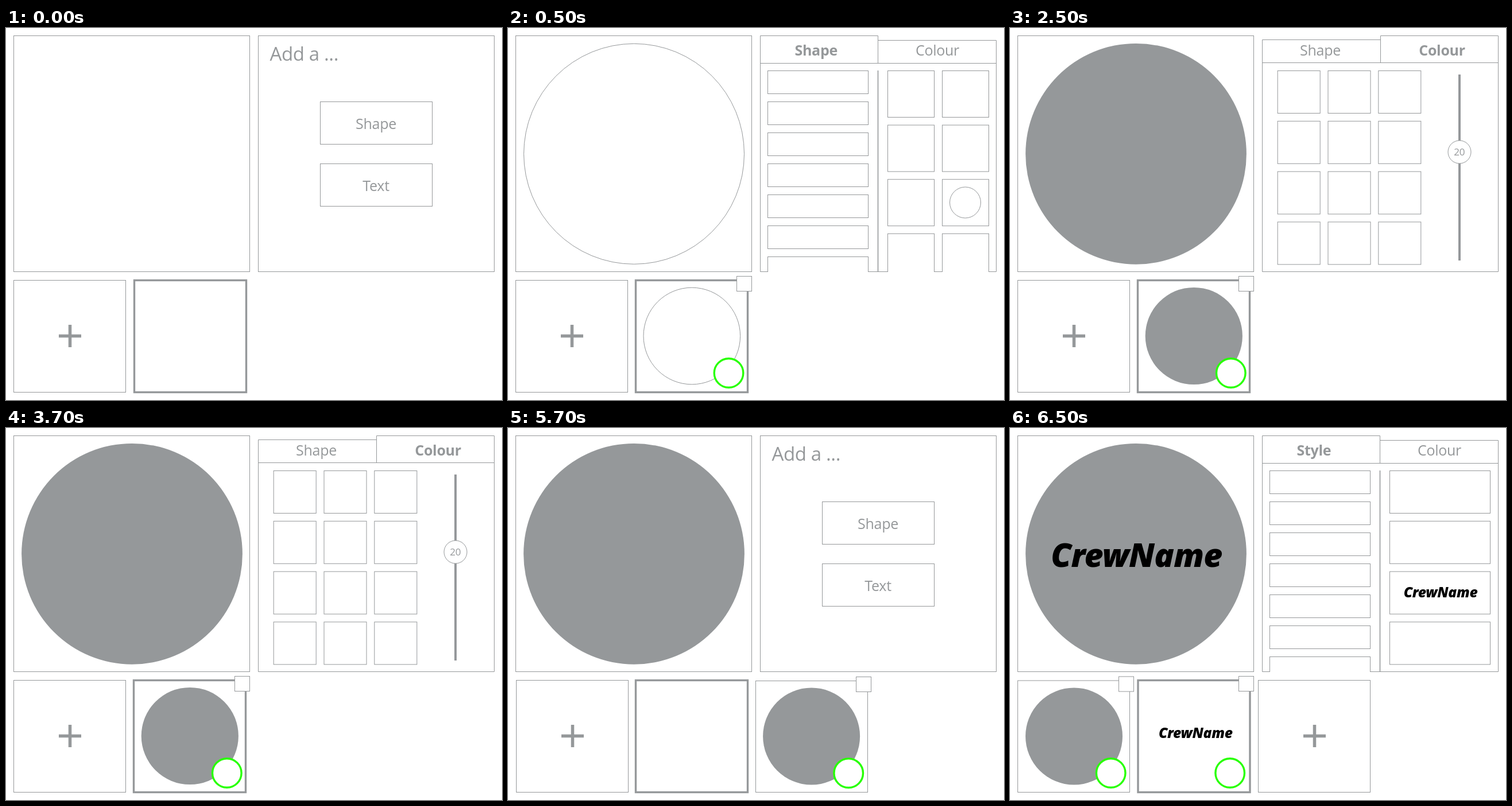
Animation, 864 px wide and 648 px high, one loop 8 s. Source, as an HTML page:

```html
<!DOCTYPE html>
<html lang="en">
<head>
<meta charset="utf-8">
<title>Crew emblem editor wireframe</title>
<style>
  html, body { margin: 0; width: 100%; height: 100%; overflow: hidden; background: #fff; }
  svg { display: block; width: 864px; height: 648px; }
  .line { fill: #fff; stroke: #95989a; stroke-width: 1; }
  .open { fill: none; }
  .thick { stroke-width: 3.4; }
  .fill { fill: #95989a; }
  .ring { fill: #fff; stroke: #27ff00; stroke-width: 3.4; }
  text { font: 25px "Open Sans", "Noto Sans", sans-serif; letter-spacing: -.012em; fill: #95989a; }
  .mid { text-anchor: middle; }
  .bold { font-weight: 700; }
  .title { font-size: 33px; }
  .value { font-size: 17px; }
  .crew { font-size: 24.6px; font-weight: 800; font-style: italic; fill: #000; }
  .large { font-size: 57px; }

  .scene { visibility: hidden; animation: 8s step-end infinite; }
  #empty  { animation-name: empty; }
  #shape  { animation-name: shape; }
  #colour { animation-name: colour; }
  #layer  { animation-name: layer; }
  #style  { animation-name: style; }
  @keyframes empty  { 0% { visibility: visible } 6.25%, 100% { visibility: hidden } }
  @keyframes shape  { 0% { visibility: hidden } 6.25% { visibility: visible } 31.25%, 100% { visibility: hidden } }
  @keyframes colour { 0% { visibility: hidden } 31.25% { visibility: visible } 56.25%, 100% { visibility: hidden } }
  @keyframes layer  { 0% { visibility: hidden } 56.25% { visibility: visible } 81.25%, 100% { visibility: hidden } }
  @keyframes style  { 0% { visibility: hidden } 81.25%, 100% { visibility: visible } }
</style>
</head>
<body>
<svg id="stage" viewBox="0 0 864 648"></svg>
<script>
  const rect = (x, y, w, h, cls = '') =>
    `<rect class="line ${cls}" x="${x}" y="${y}" width="${w}" height="${h}"/>`;
  const circle = (x, y, r, cls = 'line') => `<circle class="${cls}" cx="${x}" cy="${y}" r="${r}"/>`;
  const path = (d, width = 1) => `<path class="line open" d="${d}" style="stroke-width:${width}"/>`;
  const text = (x, y, str, cls = 'mid') => `<text class="${cls}" x="${x}" y="${y}">${str}</text>`;

  const grid = (cols, rows, x, y, dx, dy, w, h) => {
    let out = '';
    for (let r = 0; r < rows; r++)
      for (let c = 0; c < cols; c++) out += rect(x + c * dx, y + r * dy, w, h);
    return out;
  };

  const panel = x => rect(x, 13.5, 411, 411);
  const clipped = parts => `<g clip-path="url(#body)">${parts}</g>`;

  // Bottom row tiles
  const plus = (x, y = 439.5) => rect(x, y, 195, 195) +
    path(`M${x + 78.5} 536.5h39M${x + 98} 517v39`, 5.5);
  const picked = x => rect(x, 439.5, 195, 195, 'thick');
  const handles = (boxX, boxY, ringX, ringY) =>
    rect(boxX, boxY, 26, 26) + circle(ringX, ringY, 25.3, 'ring');

  const bigDisc = circle(219.5, 219.3, 192.4, 'fill');

  const addMenu = panel(439.5) +
    text(459.5, 57, 'Add a ...', 'title') +
    rect(547.5, 128.5, 195, 74) + text(644.5, 176, 'Shape') +
    rect(547.5, 236.5, 195, 74) + text(644.5, 284, 'Text');

  const listPanel = label =>
    path('M439.5 13.5H644.5V61.5M644.5 21.5H850.5V424.5H439.5V13.5M439.5 61.5H850.5') +
    text(499.5, 47.5, label, 'bold') + text(748, 47.5, 'Colour') +
    path('M644.5 74V424.5', 1.6) +
    clipped(grid(1, 7, 452.5, 74.5, 0, 54, 175, 40));

  const colourPanel =
    path('M439.5 20.5H645.5M645.5 60.5V13.5H850.5V424.5H439.5V20.5M439.5 60.5H850.5') +
    text(540.5, 47.5, 'Shape') + text(752.5, 47.5, 'Colour', 'mid bold') +
    grid(3, 4, 466.2, 74.5, 87.8, 87.8, 74, 74) +
    path('M783 81V405', 4) + circle(783, 216, 20) + text(782.8, 222, '20', 'mid value');

  const scenes = {
    empty: addMenu + plus(13.5) + picked(223.5),

    shape: circle(219.5, 219.3, 192) + listPanel('Shape') +
      clipped(grid(2, 4, 661.5, 74.5, 95, 94.6, 81, 81)) + circle(796.5, 304, 27) +
      plus(13.5) + picked(222.5) + circle(320.3, 536.5, 84.3) +
      handles(398.5, 432.5, 384.5, 601),

    colour: bigDisc + colourPanel +
      plus(13.5) + picked(222.5) + circle(320.3, 536.5, 84.6, 'fill') +
      handles(398.5, 432.5, 384.8, 601),

    layer: bigDisc + addMenu +
      plus(14.5) + picked(222.5) +
      rect(431.5, 440.5, 195, 194) + circle(528.6, 537, 84.5, 'fill') +
      handles(606.5, 433.5, 593.2, 601.2),

    style: bigDisc + text(220.5, 241.5, 'CrewName', 'mid crew large') +
      listPanel('Style') + grid(1, 4, 661.5, 74.5, 0, 87.8, 175, 74) +
      text(750, 295, 'CrewName', 'mid crew') +
      rect(13.5, 440, 195, 194.5) + circle(111.5, 537, 84.5, 'fill') +
      handles(189.5, 433, 175.7, 601) +
      picked(223) + text(323.3, 540, 'CrewName', 'mid crew') +
      handles(398.5, 432.5, 383.2, 601) +
      plus(432.5)
  };

  document.getElementById('stage').innerHTML =
    '<clipPath id="body"><rect x="439" y="61" width="412" height="364"/></clipPath>' +
    panel(13.5) +
    Object.entries(scenes).map(([id, parts]) => `<g class="scene" id="${id}">${parts}</g>`).join('');
</script>
</body>
</html>
```
